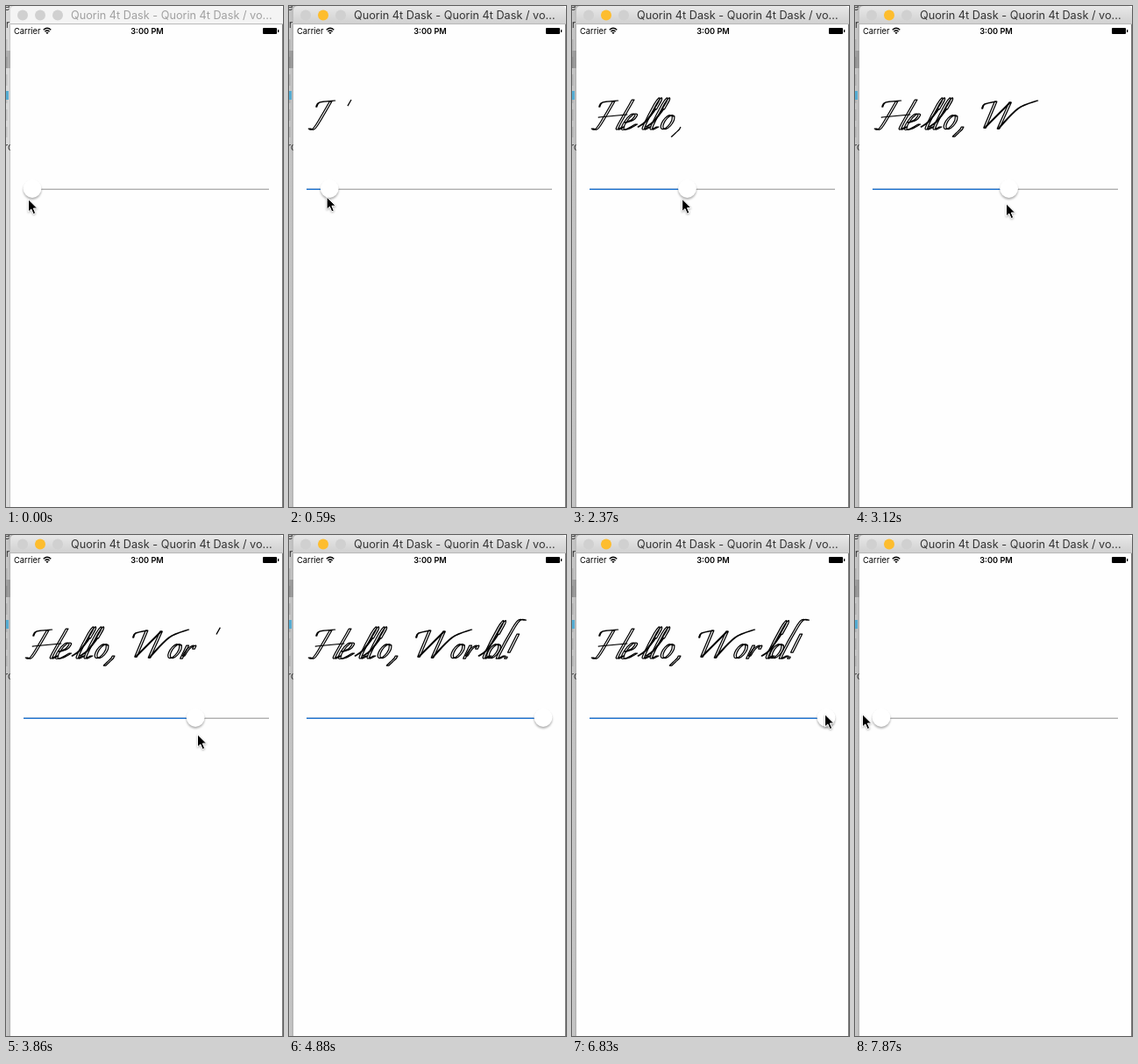
Recreate the animation shown at these times as an HTML page. Size 316 by 572 pixels, loop 8 s.

```html
<!DOCTYPE html>
<html lang="en">
<head>
<meta charset="utf-8">
<style>
  html, body { margin: 0; width: 100%; height: 100%; overflow: hidden; }
  svg { display: block; width: 316px; height: 572px; font-family: Inter, "Liberation Sans", sans-serif; }
  #strip { fill: #d9d9d9; }
  #bar { fill: #f4f4f4; }
  #lights { fill: #d0d0d0; }
  #title { font-size: 12.7px; fill: #a0a0a0; }
  .on #strip { fill: url(#shade); }
  .on #bar { fill: url(#metal); }
  .on #title { fill: #333; }
  .on #mid { fill: #fdbd2e; }
  #ink { fill: none; stroke: #000; stroke-width: 1.25; stroke-linejoin: round; }
  #knob { fill: #fff; filter: drop-shadow(0 2.5px 1.3px rgba(0, 0, 0, .3)); }
  #cursor { stroke: #fff; stroke-width: 1; filter: drop-shadow(0 1px 1px rgba(0, 0, 0, .3)); }
</style>
</head>
<body>
<svg id="stage" viewBox="0 0 316 572">
  <defs>
    <linearGradient id="metal" x2="0" y2="1">
      <stop stop-color="#e8e8e8"/><stop offset="1" stop-color="#d0d0d0"/>
    </linearGradient>
    <linearGradient id="shade">
      <stop stop-color="#c9c9c9"/><stop offset="1" stop-color="#acacac"/>
    </linearGradient>
  </defs>

  <!-- window behind -->
  <rect id="strip" width="10" height="572"/>
  <path stroke="#000" stroke-opacity=".1" stroke-width="3" stroke-dasharray="13 7" d="M0 38V150"/>
  <rect y="51" width="5" height="20" fill-opacity=".2"/>
  <rect y="97" width="3" height="10" fill="#55acd2"/>
  <g font-size="11" fill="#333">
    <text x="-2" y="5">e</text><text x="-4" y="25">/r</text><text x="-2" y="165">rc</text>
  </g>

  <!-- front window -->
  <path fill="#fefefe" d="M5 20H316V572H5Z"/>
  <path id="bar" d="M5 20.5V5Q5 0 10 0H311Q316 0 316 5V20.5Z"/>
  <path fill="#b9b9b9" d="M5 20H316V21H5Z"/>
  <path fill="#777" d="M315 21H316V572H315Z"/>
  <path fill="#999" fill-opacity=".6" d="M4.5 21H5V572H4.5Z"/>
  <g id="lights">
    <circle cx="19" cy="10.5" r="6"/><circle id="mid" cx="39" cy="10.5" r="6"/><circle cx="59" cy="10.5" r="6"/>
  </g>
  <text id="title" x="74" y="15">Quorin 4t Dask - Quorin 4t Dask / vo...</text>

  <!-- status bar -->
  <text x="9" y="32" font-size="9.3">Carrier</text>
  <text x="161" y="32" font-size="9.2" font-weight="600" text-anchor="middle">3:00 PM</text>
  <g fill="none" stroke="#000" stroke-width="1.3">
    <path d="M42.7 27.3Q47 23.2 51.3 27.3M44.4 29.2Q47 26.8 49.6 29.2"/>
    <path fill="#000" stroke="none" d="M45.4 30.4Q47 29 48.6 30.4L47 32Z"/>
  </g>
  <rect x="293" y="25" width="16" height="7" rx="1"/><rect x="310" y="27" width="1.3" height="3" rx=".5"/>

  <g id="ink"></g>

  <rect x="20" y="208.6" width="280" height="1.3" fill="#a8a8a8"/>
  <rect id="fill" x="20" y="208.6" height="1.4" fill="#1f74d2"/>
  <circle id="knob" cy="208.5" r="10.4"/>
  <path id="cursor" d="M.5 .8V15L3.8 12 6.2 17.6 8.7 16.5 6.3 11H10.7Z"/>
</svg>
<script>
const $ = id => document.getElementById(id);
const BASE = 141, SLANT = .55;

// Pen strokes: points are [x, height] in upright letters, slanted when drawn
const pen = (nib, ...points) => ({ nib, points });
const thick = (...p) => pen(1.3, ...p), hair = (...p) => pen(.5, ...p);

const stem = (x, top) => thick([x, top], [x - .5, 6], [x + 1, 0], [x + 6, 3]);
const bowl = x => thick(...Array.from({ length: 9 }, (_, i) => {
  const a = 1 + i * Math.PI / 4;
  return [x + 5 * Math.cos(a), 8.5 + 8 * Math.sin(a)];
}));
const loop = (x, top) => [
  thick([x + 1.5, top * .64], [x + 1.5, top * .93], [x - .5, top], [x - 2, top * .8],
    [x - 1, top * .15], [x + 1, 0], [x + 6, 3]),
  hair([x - 7, 3], [x - 2, 9], [x + 1.5, top * .64])
];

const H = [
  thick([30, 32], [29, 6], [27, 0], [23, 1]),
  hair([17, 26], [18, 31], [34, 33]),
  stem(51, 34),
  hair([23, 14], [53, 17])
];
const e = [thick([57, 8], [63, 11], [64, 17], [59, 17], [56, 8], [58, 0], [64, 1], [70, 6])];
const comma = [thick([121, 3], [121, 0], [119, -4], [117, -8])];
const W = [
  hair([132, 24], [132, 29], [143, 32]),
  thick([143, 32], [147, 2]),
  hair([147, 2], [160, 31]),
  thick([160, 31], [163, 1]),
  hair([163, 1], [173, 24], [190, 33])
];
const r = [thick([199, 15], [200, 0]), thick([201, 3], [202, 11], [207, 15], [208, 11])];
const d = [bowl(229), thick([245, 44], [239, 44], [237, 36], [237, 4], [239, 0], [244, 3])];
const bang = [thick([246, 28], [247, 7]), thick([247, 2], [247, 0])];

// Groups of strokes with the slider value at which each group is complete
const groups = [
  [[...H, ...e], .18],
  [[...loop(90, 36), ...loop(81, 36), bowl(104.5), ...comma, ...W], .56],
  [[bowl(188), ...r], .711],
  [[...loop(222, 43), ...d, ...bang], 1]
];

// Smooth curve through the points, without the initial move
function curve(pts) {
  const at = i => pts[Math.max(0, Math.min(pts.length - 1, i))];
  let out = '';
  for (let i = 0; i < pts.length - 1; i++) {
    const [p, q, s, t] = [at(i - 1), at(i), at(i + 1), at(i + 2)];
    const h1 = q.map((v, k) => v + (s[k] - p[k]) / 6);
    const h2 = s.map((v, k) => v - (t[k] - q[k]) / 6);
    out += `C${h1} ${h2} ${s}`;
  }
  return out;
}

function outline({ nib, points }) {
  const side = w => points.map(([x, h]) => [x + SLANT * h + w, BASE - h]);
  const right = side(nib), left = side(-nib).reverse();
  return `M${right[0]}${curve(right)}L${left[0]}${curve(left)}Z`;
}

const pieces = [];
let from = 0;
for (const [strokes, to] of groups) {
  const parts = strokes.map(s => {
    const path = document.createElementNS('http://www.w3.org/2000/svg', 'path');
    path.setAttribute('d', outline(s));
    $('ink').append(path);
    return { path, len: path.getTotalLength() };
  });
  const total = parts.reduce((sum, p) => sum + p.len, 0), room = to - from;
  for (const p of parts) {
    const span = room * p.len / total;
    pieces.push({ ...p, from, span });
    from += span;
  }
  from = to;
}

// Key poses as [step, values...]
const slider = [[0, 0], [1, 0], [10, .187], [21, .56], [26, .716], [33, 1], [46, 1], [51, .04], [52, 0]];
const pointer = [[0, 25, 220], [10, 69, 213], [21, 172, 225], [26, 218, 227], [32, 277, 239],
  [37, 142, 244], [43, 276, 225], [46, 288, 204], [52, 8, 204]];

function tween(keys, s) {
  const i = keys.findIndex(k => k[0] > s);
  if (i < 0) return keys[keys.length - 1].slice(1);
  const a = keys[i - 1], b = keys[i], u = (s - a[0]) / (b[0] - a[0]);
  return a.slice(1).map((v, k) => v + (b[k + 1] - v) * u);
}

function draw(t) {
  const step = Math.floor(t / 148.1 + .06);
  const [value] = tween(slider, step), x = 30 + 260 * value;
  $('stage').classList.toggle('on', step > 0);
  $('knob').setAttribute('cx', x);
  $('fill').setAttribute('width', x - 20);
  $('cursor').setAttribute('transform', `translate(${tween(pointer, step)})`);
  $('cursor').style.display = step > 32 && step < 37 ? 'none' : '';
  for (const p of pieces) {
    const done = Math.max(0, Math.min(1, (value - p.from) / p.span));
    p.path.style.display = done ? '' : 'none';
    p.path.setAttribute('stroke-dasharray', done < 1 ? `${done * p.len} 9999` : 'none');
  }
}

const start = performance.now();
function tick() {
  draw((performance.now() - start) % 8000);
  requestAnimationFrame(tick);
}
tick();
</script>
</body>
</html>
```
